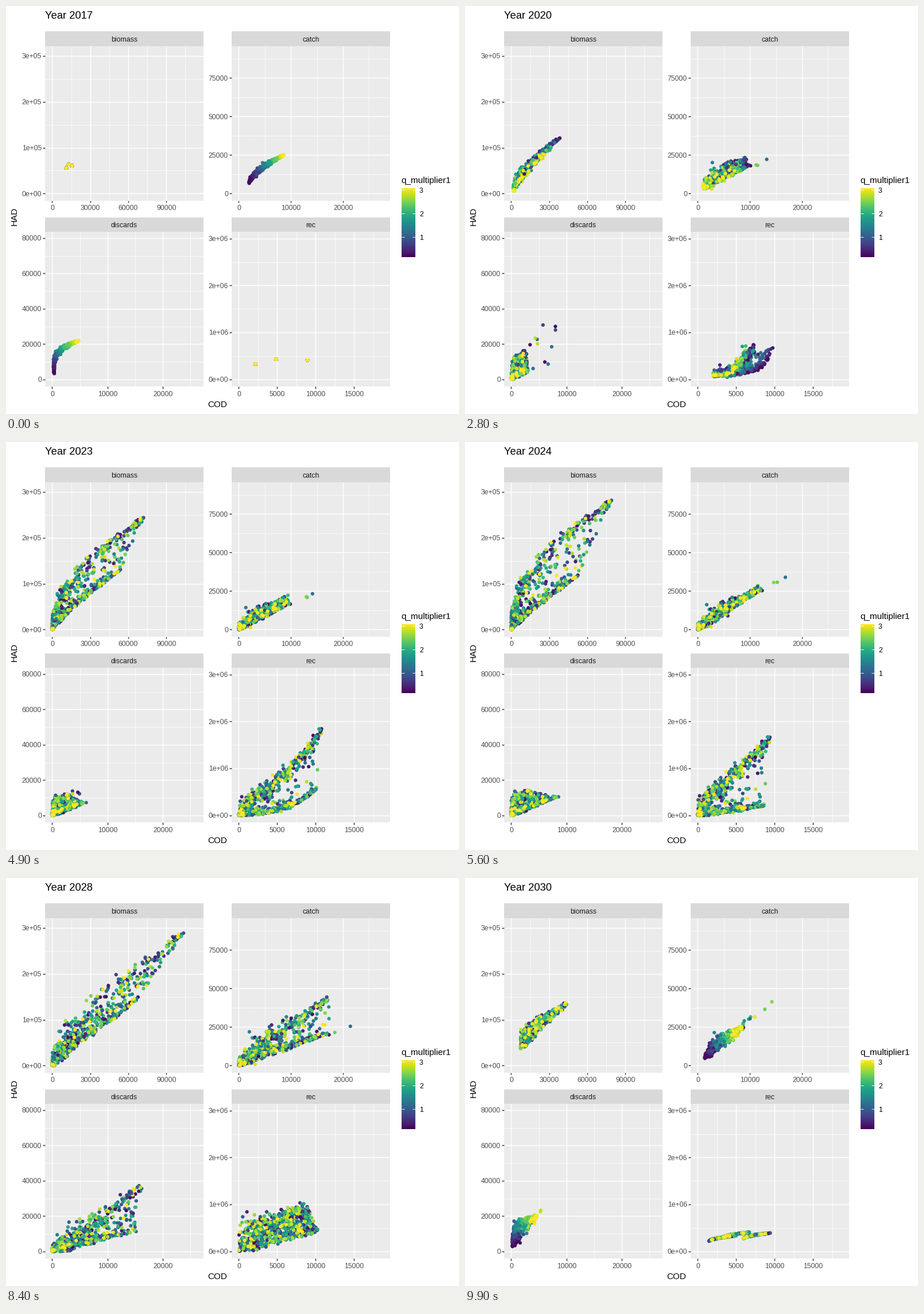
Recreate the animation shown at these times as a matplotlib script. Size 789 by 710 pixels, loop 10 s.

```python
import math
import numpy as np
import matplotlib.pyplot as plt
from matplotlib.animation import FuncAnimation
from matplotlib.patches import Rectangle

W, H, DPI = 789, 710, 100
PX = 72 / DPI                      # points per pixel
N = 800                            # simulation runs
FIRST, LAST = 2017, 2030
Q_MIN, Q_MAX = 0.15, 3.07

plt.rcParams["font.family"] = "Liberation Sans"
rng = np.random.default_rng(11)

# name: left, strip top, x step, y step, x labels, y labels
PANELS = {
    "biomass": (68, 44, 66.2, 79.8, [f"{30000 * k}" for k in range(4)],
                [f"{k}e+0{5 * (k > 0)}" for k in range(4)]),
    "catch": (393, 44, 90.8, 67, [f"{10000 * k}" for k in range(3)],
              [f"{25000 * k}" for k in range(4)]),
    "discards": (68, 367.5, 96.3, 61.5, [f"{10000 * k}" for k in range(3)],
                 [f"{20000 * k}" for k in range(5)]),
    "rec": (393, 367.5, 67, 81.7, [f"{5000 * k}" for k in range(4)],
            [f"{k}e+0{6 * (k > 0)}" for k in range(4)]),
}
PANELS["biomass"][5][0] = PANELS["rec"][5][0] = "0e+00"
PANEL_W, STRIP_H, PANEL_H = 276, 25.5, 269
PAD_X, PAD_Y = 12.5, 12.2
SPAN = PANEL_W - 2 * PAD_X


def zero(name):
    left, top = PANELS[name][:2]
    return left + PAD_X, top + STRIP_H + PANEL_H - PAD_Y


# ---- runs: multiplier, branch, place along the branch, scatter, stragglers ----
q = rng.uniform(Q_MIN, Q_MAX, N)
q = q[np.argsort(q + rng.normal(0, 1.5, N))]
q[-12:] = Q_MAX
q_unit = (q - Q_MIN) / (Q_MAX - Q_MIN)
branch = (rng.permutation(N) + 0.5) / N
along = {name: rng.random(N) for name in PANELS}
scatter = {name: rng.normal(0, 0.5, (N, 2)) for name in PANELS}
straggle = {name: (rng.permutation(N) / (N - 1)) ** 80 for name in PANELS}
clouds = {}


def rank(a):
    return np.argsort(np.argsort(a)) / (len(a) - 1)


def sharpen(s, k):
    """Push values in 0..1 towards both ends."""
    return s ** k / (s ** k + (1 - s) ** k)


def lerp(a, b, t):
    return a + (b - a) * t


def fan(year, name, low, high=None, bend=1.0, low_bend=0.85, split=4, width=6,
        power=1.5, gap=1.0, tail=0.0, trend=0.0, start=(0, 0), rise=0):
    """Runs between a low and a high curve, given by their tips in pixels from zero.

    split: how cleanly runs part into the two curves; gap: thinning half-way;
    tail: reach of stragglers; trend: how far the multiplier sets the place."""
    if high is None:
        high, low_bend = low, bend
    score = (1 - abs(trend)) * along[name] + trend * q_unit
    m = sharpen(branch, split)
    u = sharpen(rank(score) ** power, 1 + (gap - 1) * m)
    v = u + tail * straggle[name]
    lift = rise * m
    x = lerp(start[0], lerp(low[0], high[0], m), v)
    y = (start[1] + lift * (1 - np.exp(-12 * u))
         + (lerp(low[1], high[1], m) - start[1] - lift) * v ** lerp(low_bend, bend, m))
    spread = width * (0.4 + 0.6 * m) * (0.2 + np.sin(np.pi * u ** 0.6))
    xy = np.c_[x, y] + scatter[name] * spread[:, None]
    clouds[year, name] = np.minimum(np.abs(xy), SPAN)


def between(year, name, a, b, f, stretch=1.0):
    clouds[year, name] = lerp(clouds[a, name], clouds[b, name], f) * (stretch, 1)


def part(year, gains):
    """Turn clouds one third of the way to the next year into both end states."""
    for name, k in zip(PANELS, gains):
        c = clouds[year, name]
        clouds[year, name] = np.minimum(c * (1 + k), SPAN)
        clouds[year + 1, name] = np.minimum(c * (1 - 2 * k), SPAN)


# three starting stocks shared by all runs
for name, xs, ys in (("biomass", (24.5, 28.5, 34.5), (44.5, 50.5, 48.5)),
                     ("rec", (29, 65, 119.5), (26.5, 35.5, 33.5))):
    stock = np.arange(N) % 3
    clouds[2017, name] = np.c_[np.take(xs, stock), np.take(ys, stock)]
fan(2017, "catch", (78, 67), bend=0.65, width=3.5, power=1, trend=0.93, start=(18, 18))
fan(2017, "discards", (46, 67), bend=0.25, width=3.5, power=2.3, trend=0.93, start=(3, 10))

fan(2019, "biomass", (61, 80), bend=0.58, width=6, power=1.7, trend=-0.6, start=(7, 8))
fan(2019, "catch", (86, 64), bend=0.8, width=10, power=1.3, trend=-0.45, start=(18, 16),
    tail=0.3)
fan(2019, "discards", (28, 18), (17, 58), bend=0.8, split=1.5, width=9, power=1,
    trend=-0.3, tail=2.5)
fan(2019, "rec", (127, 26), (73, 34), low_bend=2, split=8, width=9, power=2,
    trend=-0.7, start=(42, 13))

fan(2022, "biomass", (115, 117), bend=0.72, width=7, power=2.4)
fan(2022, "catch", (100, 31), (82, 56), bend=0.6, split=2.5, width=11, tail=0.9)
fan(2022, "discards", (32, 10), (32, 40), bend=0.5, split=1.5, width=10, power=1.8, tail=3)
fan(2022, "rec", (101, 94), bend=4, width=5, power=1.3)

fan(2024, "biomass", (116, 93), (174, 224), bend=0.5, width=8, power=2, gap=1.5)
fan(2024, "catch", (114, 70), (105, 72), bend=0.8, split=2, width=10, power=1.8, tail=0.6)
fan(2024, "discards", (80, 32), (30, 42), bend=0.4, split=3, width=9, power=2, tail=0.5)
fan(2024, "rec", (115, 17), (125, 136), bend=1.3, split=8, width=11, rise=28)

fan(2026, "biomass", (130, 80), (212, 235), bend=0.5, width=10, power=2, gap=1.5)
fan(2026, "catch", (163, 76), (138, 116), bend=0.7, split=3, width=18, power=1.8)
fan(2026, "discards", (90, 30), (32, 90), bend=0.6, split=1.4, width=20, power=2, tail=1)
fan(2026, "rec", (65, 12), (80, 42), split=6, width=5, rise=28)

fan(2028, "biomass", (142, 107), (229, 231), bend=0.7, split=2, width=15, power=2, gap=1.3)
fan(2028, "catch", (160, 56), (155, 116), bend=0.85, width=14, power=2, tail=0.4)
fan(2028, "discards", (145, 34), (155, 117), split=2, width=15, power=2.5, tail=0.35)
fan(2028, "rec", (139, 34), (114, 86), bend=3, split=1.3, width=14, power=0.9, rise=55)

fan(2030, "biomass", (245, 238), (90, 150), bend=0.5, split=1.5, width=22, power=1.7)
fan(2030, "catch", (72, 64), bend=0.9, width=22, power=1.2, trend=0.5, tail=2.8)
fan(2030, "discards", (42, 50), bend=0.7, width=24, power=1.2, trend=0.5, tail=2)
fan(2030, "rec", (140, 29), bend=0.55, width=3, power=1)

part(2024, (0.04, -0.24, -0.18, 0.32))
part(2026, (0.03, -0.13, -0.1, -0.25))
part(2028, (0.04, 0.28, 0.26, -0.15))
for name in PANELS:
    stretch = 1.2 if name == "rec" else 1
    between(2018, name, 2017, 2019, 1 / 2, stretch)
    between(2020, name, 2019, 2022, 1 / 3, stretch)
    between(2021, name, 2019, 2022, 2 / 3)
    between(2023, name, 2022, 2024, 1 / 2)

states = [np.concatenate([np.array(zero(n)) + clouds[year, n] * (1, -1) for n in PANELS])
          for year in range(FIRST, LAST + 1)]

# ---- timeline: four still frames, then a linear move of three or four steps ----
timeline = []
for i in range(len(states)):
    steps = 4 if i < 3 else 3
    timeline += [(i, 0, FIRST + i)] * 4
    for j in range(1, steps + 1):
        timeline.append((i, j / steps, FIRST + i + (j > math.ceil(steps / 2))))
timeline = timeline[:100]

# ---- static drawing ----
fig = plt.figure(figsize=(W / DPI, H / DPI), dpi=DPI, facecolor="white")
ax = fig.add_axes([0, 0, 1, 1])
ax.axis("off")


def box(x, y, w, h, color):
    ax.add_patch(Rectangle((x, y), w, h, facecolor=color, linewidth=0, zorder=1))


def line(x0, y0, x1, y1, color="white", width=1.48):
    ax.plot([x0, x1], [y0, y1], color=color, lw=width * PX, zorder=2,
            solid_capstyle="butt")


def label(x, y, s, size=8.8, color="black", ha="center", va="baseline", **kw):
    return ax.text(x, y, s, fontsize=size, color=color, ha=ha, va=va, zorder=4, **kw)


def draw_panel(name):
    left, top, dx, dy, xs, ys = PANELS[name]
    right, y_top = left + PANEL_W, top + STRIP_H
    bottom = y_top + PANEL_H
    x0, y0 = zero(name)
    box(left, top, PANEL_W, STRIP_H, "#D9D9D9")
    label((left + right) / 2, top + 17.8, name, color="#1A1A1A")
    box(left, y_top, PANEL_W, PANEL_H, "#EBEBEB")
    for k in range(6):
        x, y = x0 + (k + 0.5) * dx, y0 - (k + 0.5) * dy
        if x < right:
            line(x, y_top, x, bottom, width=0.74)
        if y > y_top:
            line(left, y, right, y, width=0.74)
    for k, s in enumerate(xs):
        x = x0 + k * dx
        line(x, y_top, x, bottom)
        line(x, bottom, x, bottom + 3.8, "#333333")
        label(x, bottom + 16.9, s, color="#4D4D4D")
    for k, s in enumerate(ys):
        y = y0 - k * dy
        line(left, y, right, y)
        line(left - 3.8, y, left, y, "#333333")
        label(left - 6, y + 4.4, s, color="#4D4D4D", ha="right")


for name in PANELS:
    draw_panel(name)
label(368.5, 698.5, "COD", 11)
label(14.5, 366, "HAD", 11, va="center", rotation=90)

label(688.5, 308, "q_multiplier1", 11, ha="left")
ax.imshow(np.linspace(1, 0, 256)[:, None], cmap="viridis", aspect="auto",
          extent=(689, 713, 437, 317), zorder=1)
for value in (1, 2, 3):
    y = 402 - (value - 1) * 41
    line(689, y, 693.8, y, width=0.9)
    line(708.2, y, 713, y, width=0.9)
    label(720, y + 4.6, str(value), ha="left")

title = label(68, 22, "", 13.2, ha="left")
dots = ax.scatter(*states[0].T, s=(6.2 * PX) ** 2, c=np.tile(q_unit, len(PANELS)),
                  cmap="viridis", vmin=0, vmax=1, linewidths=0, zorder=3)
ax.set_xlim(0, W)
ax.set_ylim(H, 0)


def update(n):
    i, f, year = timeline[n]
    dots.set_offsets(lerp(states[i], states[(i + 1) % len(states)], f))
    title.set_text(f"Year {year}")
    return dots, title


anim = FuncAnimation(fig, update, frames=len(timeline), interval=100, repeat=True,
                     repeat_delay=0, blit=False)
plt.show()
```
